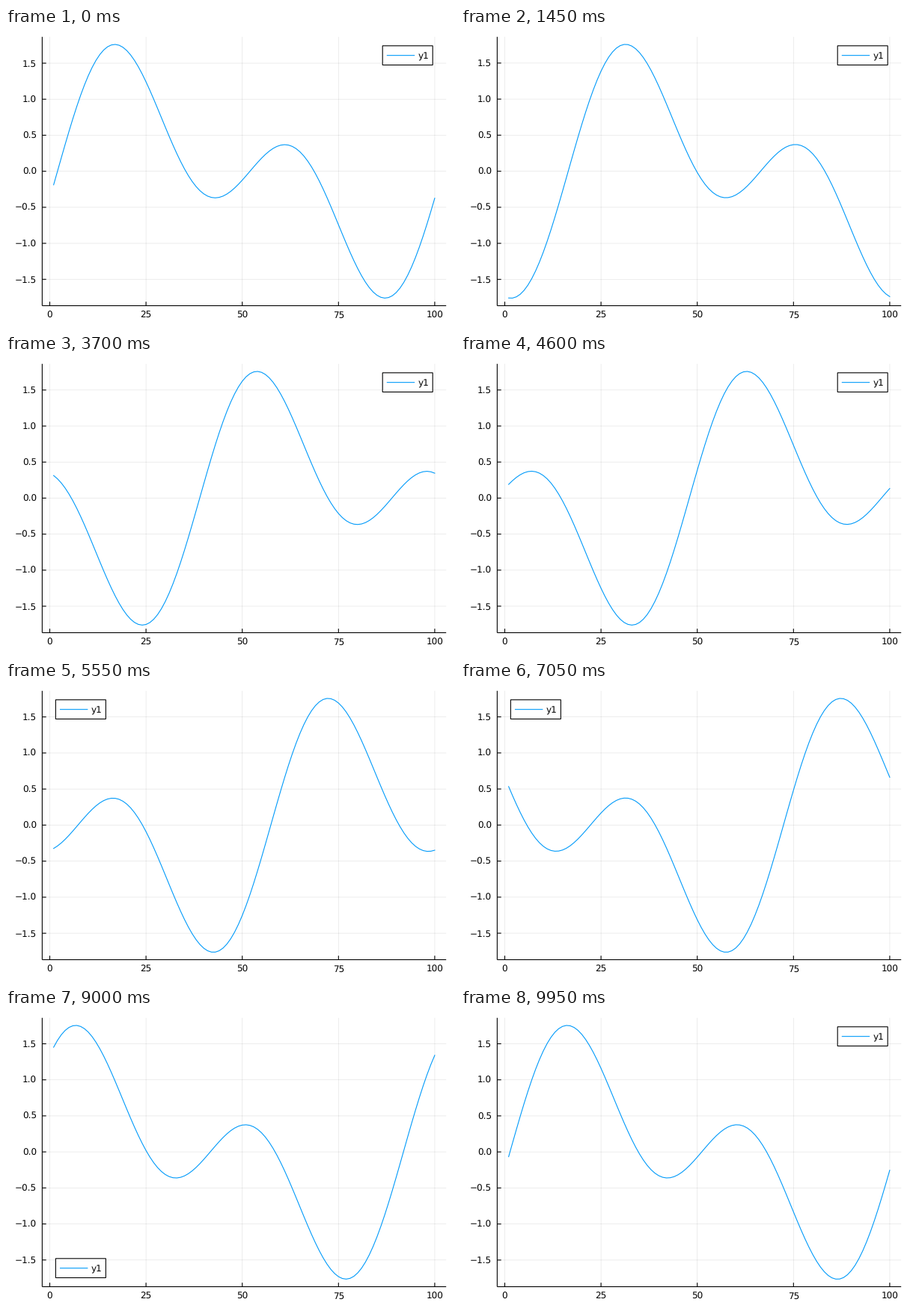
These frames come from a looping animation (600 by 400 pixels, 10 s). A matplotlib script:

```python
import numpy as np
import matplotlib as mpl
import matplotlib.pyplot as plt
from matplotlib.animation import FuncAnimation
from matplotlib.patches import Rectangle

mpl.rcParams["path.snap"] = False
mpl.rcParams["text.hinting"] = "none"
mpl.rcParams["font.family"] = "DejaVu Sans"

WIDTH, HEIGHT, DPI = 600, 400, 100
FRAMES, INTERVAL = 200, 50
PX = 72 / DPI                       # points per pixel
LEFT, RIGHT, TOP, BOTTOM = 48.37, 588.19, 11.81, 371.5
TICK = 5.3
FONT = 12 * PX
CAP = 8.75                          # digit height in pixels
BLUE = "#009afa"
LEGEND_W, LEGEND_H = 67.0, 25.7

N = 100
STEP = 2 * np.pi / N
COURANT = 0.5
x = np.arange(1, N + 1)
X_LIM = (1 - 0.03 * (N - 1), N + 0.03 * (N - 1))
Y_TICKS = np.arange(-1.5, 1.6, 0.5)


def wave(frame):
    """Two sine modes advected with the leapfrog scheme's dispersion."""
    total = np.zeros(N)
    for k in (1, 2):
        speed = np.arcsin(COURANT * np.sin(k * STEP))
        total += np.sin(k * STEP * (x - 2) - frame * speed)
    return total


def fraction(values, lim):
    return (np.asarray(values) - lim[0]) / (lim[1] - lim[0])


def to_px_x(values):
    return LEFT + fraction(values, X_LIM) * (RIGHT - LEFT)


def to_px_y(values, lim):
    return BOTTOM - fraction(values, lim) * (BOTTOM - TOP)


def legend_corner(y, lim):
    """First corner, in order of preference, with the fewest points."""
    fx, fy = fraction(x, X_LIM), fraction(y, lim)
    corners = [(1, 1), (0, 1), (1, 0), (0, 0)]
    return min(corners, key=lambda c: np.sum((abs(fx - c[0]) <= 0.25)
                                             & (abs(fy - c[1]) <= 0.25)))


fig = plt.figure(figsize=(WIDTH / DPI, HEIGHT / DPI), dpi=DPI, facecolor="white")
ax = fig.add_axes([0, 0, 1, 1])
ax.set_xlim(0, WIDTH)
ax.set_ylim(HEIGHT, 0)
ax.axis("off")


def line(xs, ys, color="black", width=1.1, z=2, **kw):
    return ax.plot(xs, ys, color=color, lw=width * PX, zorder=z, **kw)[0]


def label(px, py, text, ha, z=3):
    return ax.text(px, py, text, ha=ha, va="baseline", fontsize=FONT,
                   color="black", zorder=z)


def grid_line(xs, ys):
    return line(xs, ys, width=0.7, z=1, alpha=0.1, solid_capstyle="butt")


# Fixed horizontal axis
for value in range(0, 101, 25):
    px = to_px_x(value)
    grid_line([px, px], [TOP, BOTTOM])
    line([px, px], [BOTTOM, BOTTOM - TICK], solid_capstyle="butt")
    label(px, 388.2, str(value), "center")
line([LEFT, RIGHT], [BOTTOM, BOTTOM], solid_capstyle="butt")
line([LEFT, LEFT], [TOP, BOTTOM], solid_capstyle="butt")

# Vertical axis parts, which follow the data limits
y_parts = []
for value in Y_TICKS:
    name = f"{abs(value):.1f}"
    if value < 0:
        name = "\u2212" + name
    y_parts.append((grid_line([LEFT, RIGHT], [0, 0]),
                    line([LEFT, LEFT + TICK], [0, 0], solid_capstyle="butt"),
                    label(41, 0, name, "right")))

curve = line(to_px_x(x), np.zeros(N), BLUE, z=4, solid_joinstyle="round")

legend_box = ax.add_patch(Rectangle((0, 0), LEGEND_W, LEGEND_H, facecolor="white",
                                    edgecolor="black", lw=1.1 * PX, zorder=5))
legend_line = line([0, 0], [0, 0], BLUE, z=6, solid_capstyle="butt")
legend_text = label(0, 0, "y1", "left", z=6)


def place_legend(corner):
    gap_x, gap_y = (RIGHT - LEFT) / 30, (BOTTOM - TOP) / 30
    px = RIGHT - gap_x - LEGEND_W if corner[0] else LEFT + gap_x
    py = TOP + gap_y if corner[1] else BOTTOM - gap_y - LEGEND_H
    mid = py + LEGEND_H / 2
    legend_box.set_xy((px, py))
    legend_line.set_data([px + 5.6, px + 43], [mid, mid])
    legend_text.set_position((px + 47.3, mid + CAP / 2))


def update(frame):
    y = wave(frame)
    pad = 0.03 * (y.max() - y.min())
    lim = (y.min() - pad, y.max() + pad)
    curve.set_ydata(to_px_y(y, lim))
    for value, (grid, tick, text) in zip(Y_TICKS, y_parts):
        py = to_px_y(value, lim)
        grid.set_ydata([py, py])
        tick.set_ydata([py, py])
        text.set_y(py + CAP / 2)
    place_legend(legend_corner(y, lim))
    return []


anim = FuncAnimation(fig, update, frames=FRAMES, interval=INTERVAL,
                     repeat=True, repeat_delay=0, blit=False)
plt.show()
```
